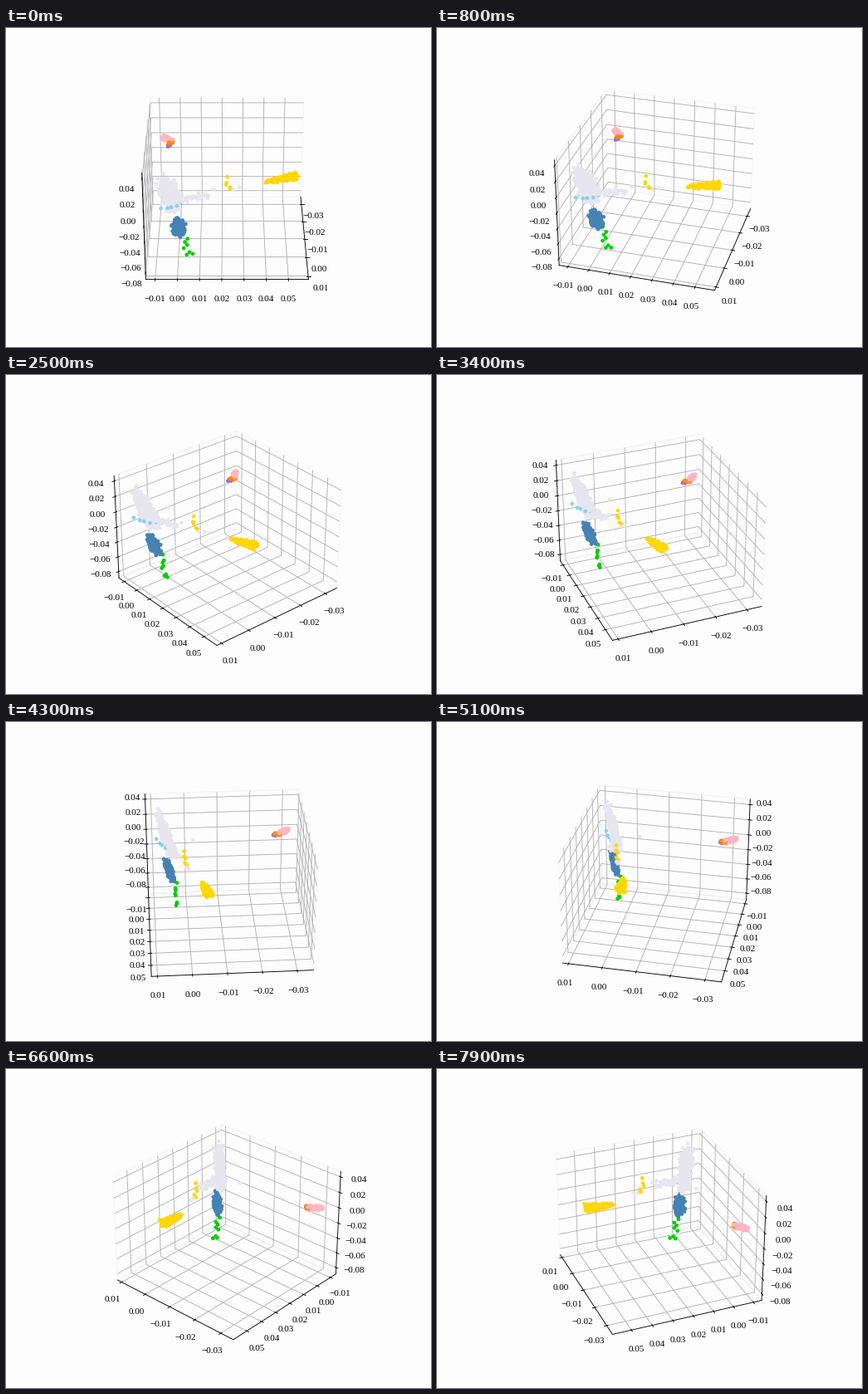
Recreate the animation shown at these times as a matplotlib script. Size 512x384 px, loop 8 s.

```python
import numpy as np
import matplotlib.pyplot as plt
from matplotlib.animation import FuncAnimation

FRAMES, INTERVAL = 80, 100
LOW = np.array([-0.0347, -0.0142, -0.0888])
HIGH = np.array([0.0117, 0.0590, 0.0468])
BOX = np.array([1.1905, 1.1905, 0.8929])  # plot box size in view units

plt.rcParams["font.family"] = "Liberation Serif"
rng = np.random.default_rng(7)


def normal(n, width):
    return rng.normal(size=(n, width)).clip(-2.1, 2.1)


def blob(n, centre, noise, *axes):
    """Cloud around a centre, stretched along the given axes."""
    points = np.array(centre) + normal(n, 3) * noise
    return points + sum(normal(n, 1) * np.array(axis) for axis in axes)


def strand(n, start, end, noise, power=1):
    """Points spaced along a line, denser at its start for powers above 1."""
    r = np.linspace(0, 1, n)[:, None] ** power
    return start + r * np.subtract(end, start) + normal(n, 3) * noise


def streak(n):
    """Long cloud with a thin end."""
    t = rng.beta(2.4, 1.5, (n, 1))
    path = np.array([0.20, 0.263, 0.148]) + t * [-0.03, 0.25, 0.03]
    return path + normal(n, 3) * [0.015, 0.004, 0.012] * (0.25 + 0.9 * t)


groups = {
    "#e7e6ee": np.vstack([
        blob(420, (0.447, -0.414, 0.178), 0.013,
             (0.020, -0.012, 0.071), (-0.012, 0.024, 0)),
        strand(48, (0.42, -0.37, 0.13), (0.37, -0.115, 0.145), 0.015, 1.7),
        strand(2, (0.31, 0.045, 0.145), (0.29, 0.088, 0.155), 0),
        [(0.50, -0.452, 0.385), (0.236, -0.412, 0.127)],
    ]),
    "#87cefa": strand(5, (0.51, -0.475, 0.11), (0.43, -0.323, 0.095), 0.006),
    "#4682b4": blob(260, (0.425, -0.354, -0.11), 0.0095,
                    (0.010, -0.005, 0.037), (-0.007, 0.018, 0)),
    "#00cd00": strand(8, (0.38, -0.31, -0.21), (0.384, -0.30, -0.385),
                      (0.008, 0.022, 0.008)),
    "#ffd700": np.vstack([
        streak(260),
        strand(5, (0.318, 0.01, 0.26), (0.318, 0.01, 0.155),
               (0.008, 0.02, 0.003), 0.5),
    ]),
    "#9370db": blob(3, (-0.40, -0.447, 0.136), 0.007),
    "#ff8c00": blob(9, (-0.414, -0.432, 0.141), (0.014, 0.016, 0.006)),
    "#ffb6c1": blob(90, (-0.472, -0.468, 0.146), 0.008, (0.017, 0.019, 0)),
}

fig = plt.figure(figsize=(6.4, 4.8), dpi=80, facecolor="#fdfdfd")
ax = fig.add_subplot(projection="3d", facecolor="#fdfdfd")

# One scatter, so that all points are sorted by depth together.
points = np.vstack(list(groups.values()))
colors = [color for color, part in groups.items() for _ in part]
data = (LOW + HIGH) / 2 + points * (HIGH - LOW) / BOX
ax.scatter(*data.T, s=10, c=colors, depthshade=False)

ax.set(xlim=(LOW[0], HIGH[0]), ylim=(LOW[1], HIGH[1]), zlim=(LOW[2], HIGH[2]),
       xticks=np.arange(-3, 2) / 100, yticks=np.arange(-1, 6) / 100,
       zticks=np.arange(-8, 5, 2) / 100)
for axis in (ax.xaxis, ax.yaxis, ax.zaxis):
    axis.pane.fill = False


def update(i):
    # The small offsets keep the z axis on the left at 0 and 90 degrees.
    ax.view_init(elev=30, azim=0.001 + 1.99997 * i)
    return []


anim = FuncAnimation(fig, update, frames=FRAMES, interval=INTERVAL,
                     init_func=lambda: [], repeat=True, repeat_delay=0)
plt.show()
```
